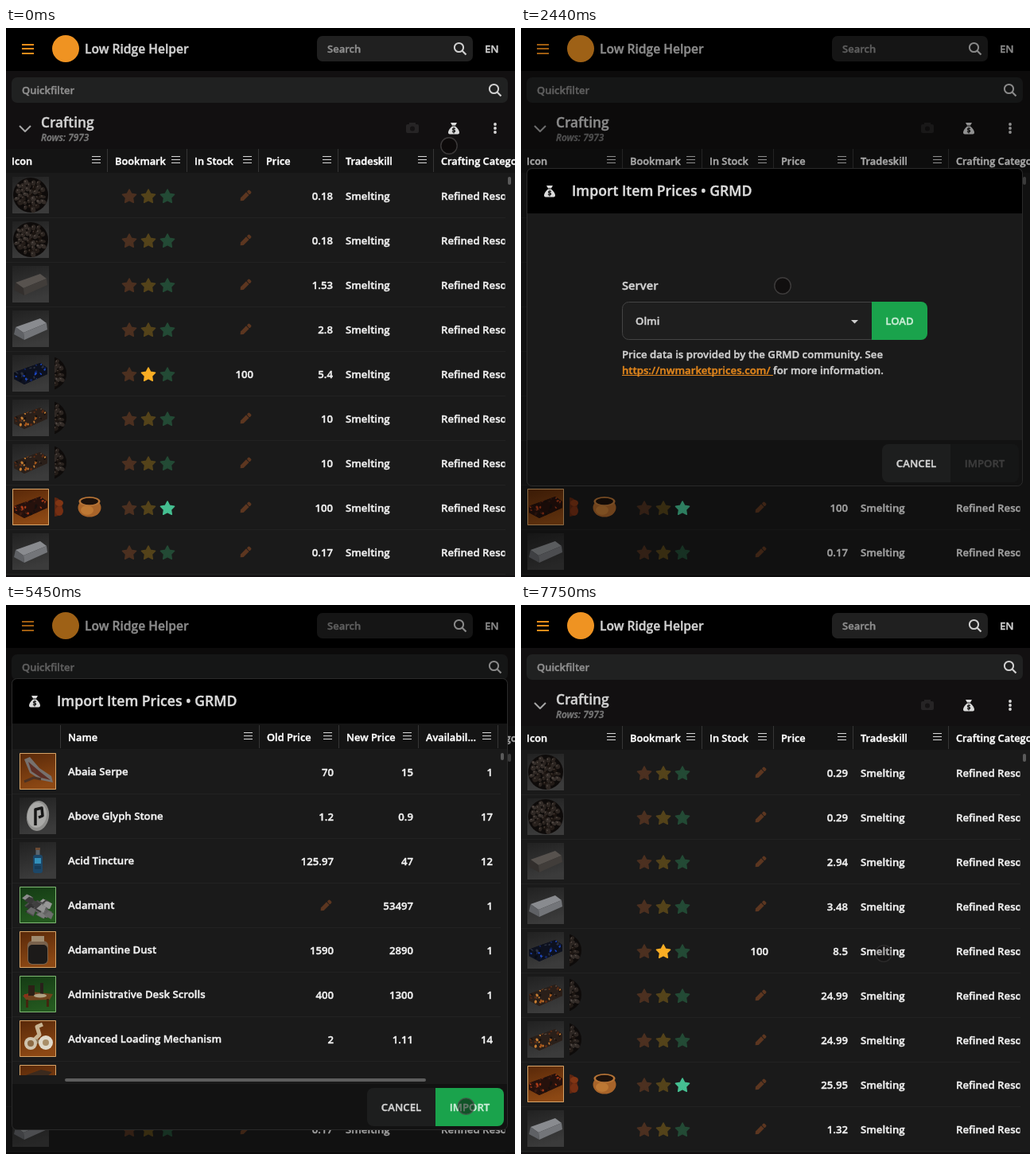
An HTML page with a canvas for the animation above (7.95 s loop, 640 by 690 pixels).

```html
<!DOCTYPE html>
<html lang="en">
<head>
<meta charset="utf-8">
<title>Price import</title>
<style>
html, body { margin: 0; width: 100%; height: 100%; overflow: hidden; background: #111; }
canvas { display: block; width: 640px; height: 690px; }
</style>
</head>
<body>
<canvas id="stage" width="640" height="690"></canvas>
<script>
const g = document.getElementById('stage').getContext('2d');
const LOOP = 7950;
const FONT = '"Open Sans", "Noto Sans", sans-serif';
const ORANGE = '#f18d1a', GREEN = '#1aa34c';
const grey = v => `rgb(${v},${v},${v})`;

const clamp = v => Math.max(0, Math.min(1, v));
const ramp = (t, a, b) => clamp((t - a) / (b - a));
const ease = v => v * v * (3 - 2 * v);

let seed = 1;
const rnd = () => (seed = seed * 16807 % 2147483647) / 2147483647;

// a hairline outline thickens the semibold letters without widening them
function text(s, x, y, size, color, align = 'left', weight = 600, style = '') {
  g.font = `${style} ${weight} ${size}px ${FONT}`;
  g.fillStyle = g.strokeStyle = color;
  g.textAlign = align;
  g.lineJoin = 'round';
  g.lineWidth = 0.4;
  g.fillText(s, x, y + size * 0.36);
  if (weight > 500) g.strokeText(s, x, y + size * 0.36);
}
function rect(x, y, w, h, color) {
  g.fillStyle = color;
  g.fillRect(x, y, w, h);
}
function round(x, y, w, h, r, fill, stroke) {
  g.beginPath();
  g.roundRect(x, y, w, h, r);
  if (fill) { g.fillStyle = fill; g.fill(); }
  if (stroke) { g.strokeStyle = stroke; g.lineWidth = 1; g.stroke(); }
}
function dot(x, y, rx, color, ry = rx, turn = 0) {
  g.beginPath();
  g.ellipse(x, y, rx, ry, turn, 0, 7);
  g.fillStyle = color;
  g.fill();
}
function line(pts, color, width) {
  g.beginPath();
  pts.forEach(p => g.lineTo(...p));
  g.strokeStyle = color;
  g.lineWidth = width;
  g.stroke();
}
function poly(pts, color) {
  g.beginPath();
  pts.forEach(p => g.lineTo(...p));
  g.closePath();
  g.fillStyle = color;
  g.fill();
}
function at(x, y, draw) {
  g.save();
  g.translate(x, y);
  draw();
  g.restore();
}
function faded(alpha, draw) {
  if (alpha <= 0) return;
  g.save();
  g.globalAlpha = alpha;
  draw();
  g.restore();
}
function clipped(x, y, w, h, draw) {
  g.save();
  g.beginPath();
  g.rect(x, y, w, h);
  g.clip();
  draw();
  g.restore();
}

// interface symbols
function star(x, y, color) {
  g.beginPath();
  for (let i = 0; i < 10; i++) {
    const r = i % 2 ? 4.6 : 9, a = i * Math.PI / 5 - Math.PI / 2;
    g.lineTo(x + r * Math.cos(a), y + 1 + r * Math.sin(a));
  }
  g.closePath();
  g.lineJoin = 'round';
  g.lineWidth = 1.6;
  g.strokeStyle = g.fillStyle = color;
  g.fill();
  g.stroke();
}
function pencil(x, y) {
  at(x, y, () => {
    g.rotate(-Math.PI / 4);
    poly([[-9, 0], [-6, -2.6], [4, -2.6], [4, 2.6], [-6, 2.6]], '#5c3620');
    round(4.8, -2.6, 4, 5.2, 1.5, '#5c3620');
  });
}
function lens(x, y) {
  g.beginPath();
  g.arc(x - 1.5, y - 1.5, 5.6, 0, 7);
  g.strokeStyle = '#d0d0d0';
  g.lineWidth = 2;
  g.stroke();
  line([[x + 2.5, y + 2.5], [x + 7.5, y + 7.5]], '#d0d0d0', 2.2);
}
function bag(x, y) {
  at(x, y, () => {
    poly([[-4, -7], [4, -7], [2, -3.5], [-2, -3.5]], '#dcdcdc');
    g.beginPath();
    g.moveTo(-2, -2.5);
    g.bezierCurveTo(-5, 0, -7, 3, -7, 5.5);
    g.quadraticCurveTo(-7, 7.5, -5, 7.5);
    g.lineTo(5, 7.5);
    g.quadraticCurveTo(7, 7.5, 7, 5.5);
    g.bezierCurveTo(7, 3, 5, 0, 2, -2.5);
    g.closePath();
    g.fill();
    text('$', 0, 2.8, 8, '#181818', 'center', 700);
  });
}
function colMenu(x, y) {
  for (const d of [-4, 0, 4]) rect(x - 5, y + d - 1, 11, 1, '#d8d8d8');
}

// item pictures
function ore(x, y, r = 23) {
  seed = 77;
  dot(x, y, r - 1, '#0e0b0a');
  for (let i = 0; i < 34; i++) {
    const a = i * 2.4, d = (r - 4) * Math.sqrt(i / 34), v = 16 + rnd() * 30;
    const px = x + d * Math.cos(a), py = y + d * Math.sin(a);
    dot(px, py, 2.4 + rnd() * 2, `rgb(${v + 8},${v + 1},${v - 3})`, 2 + rnd() * 1.6, a);
    dot(px - 1, py - 1, 1, `rgb(${v + 52},${v + 42},${v + 36})`, 0.7, a);
  }
}
const hull = [[-21, -1], [12, -13], [21, -7], [21, 1], [-8, 14], [-21, 7]];
function ingot(x, y, top, front, side, specks) {
  at(x, y, () => {
    poly([[-19, -2], [12, -13], [20, -7], [-9, 5]], top);
    poly([[-19, -2], [-9, 5], [-8, 14], [-21, 7]], front);
    poly([[-9, 5], [20, -7], [21, 1], [-8, 14]], side);
    if (!specks) return;
    poly(hull, top);
    g.clip();
    seed = 31;
    for (let i = 0; i < 44; i++)
      dot(-20 + rnd() * 40, -12 + rnd() * 25, 0.7 + rnd() * 1.6, specks[i % specks.length], 0.6 + rnd(), rnd() * 3);
  });
}
const backs = {
  plain: ['#212121', '#3b3b3b'],
  gold: ['#582809', '#8c4814', '#d7a468'],
  green: ['#143a14', '#24591f', '#7fb873']
};
function tile(x, y, kind) {
  const [a, b, edge] = backs[kind], grad = g.createLinearGradient(x, y, x + 12, y + 46);
  grad.addColorStop(0, a);
  grad.addColorStop(1, b);
  rect(x, y, 46, 46, grad);
  if (edge) { g.strokeStyle = edge; g.lineWidth = 1; g.strokeRect(x + .5, y + .5, 45, 45); }
}
const steel = (x, y) => ingot(x, y, '#898b8f', '#5f6165', '#737579');
const ember = (x, y) => ingot(x, y, '#2a1f19', 0, 0, ['#a8581c', '#57493f', '#5c2b13', '#c57c31', '#15100e']);
const pictures = [
  ore, ore,
  (x, y) => ingot(x, y, '#57524e', '#332f2d', '#413d3a'),
  steel,
  (x, y) => ingot(x, y, '#0d111f', 0, 0, ['#1c48c9', '#11235f', '#2b3140', '#080b14']),
  ember, ember,
  (x, y) => ingot(x, y, '#26110c', 0, 0, ['#a83a18', '#3c1a10', '#16100e']),
  steel
];

function pot(x, y) {
  dot(x, y + 2, 14.5, '#a8642a', 11.5);
  dot(x - 3, y + 5, 8, '#bd7834', 6);
  dot(x, y - 6, 13.5, '#b57336', 6);
  dot(x, y - 6, 11, '#1c110b', 4.2);
}

const loot = [
  ['Abaia Serpe', '70', '15', '1', 'gold', () => {
    poly([[-17, -15], [-10, -18], [2, -4], [17, 6], [19, 14], [4, 11], [-10, 2]], '#77716e');
    poly([[-12, -12], [2, 0], [16, 11], [4, 8], [-8, 0]], '#5e2f25');
    line([[-17, 13], [-5, 8], [4, 10]], '#4c3224', 3);
  }],
  ['Above Glyph Stone', '1.2', '0.9', '17', 'plain', () => {
    dot(0, 0, 14, '#8e8e8c', 19, .15);
    dot(-1, -1, 12, '#a9a9a7', 16, .15);
    line([[-3, 12], [-3, -8], [5, -10], [6, 0], [1, 2]], '#171717', 3.5);
  }],
  ['Acid Tincture', '125.97', '47', '12', 'plain', () => {
    rect(-2.5, -14, 5, 8, '#5a656e');
    rect(-3, -16, 6, 3, '#6b4a33');
    round(-6, -7, 12, 23, 3, '#1d4767');
    rect(-4, -3, 8, 7, '#3290bb');
    rect(-4, 7, 8, 4, '#173c59');
  }],
  ['Adamant', null, '53497', '1', 'green', () => {
    seed = 9;
    for (let i = 0; i < 30; i++) {
      const v = 40 + rnd() * 130, x = -15 + rnd() * 29, y = -10 + rnd() * 23;
      poly([[x - 6, y], [x, y - 5], [x + 6, y - 2], [x + 3, y + 5]], grey(v));
    }
  }],
  ['Adamantine Dust', '1590', '2890', '1', 'gold', () => {
    round(-13, -11, 26, 30, 6, '#79624c');
    round(-12, -6, 24, 24, 5, '#1c1a19');
    rect(-8, -17, 16, 7, '#9f8b70');
  }],
  ['Administrative Desk Scrolls', '400', '1300', '1', 'green', () => {
    poly([[-19, 2], [-8, -3], [19, 0], [15, 7], [-14, 8]], '#6f431d');
    rect(-15, 7, 3, 10, '#43260f');
    rect(11, 6, 3, 10, '#43260f');
    rect(-12, -11, 8, 13, '#2c2016');
    rect(3, -14, 4, 16, '#29201b');
    dot(3, 2, 8, '#b0a283', 2.5);
    rect(-17, 0, 5, 4, '#8a3119');
  }],
  ['Advanced Loading Mechanism', '2', '1.11', '14', 'gold', () => {
    line([[-6, 3], [2, -5], [-1, -15], [6, -18]], '#c8b493', 5);
    line([[-10, 2], [8, 5]], '#8f7756', 5);
    dot(-9, 6, 8, '#cfc3ad');
    dot(-9, 6, 4, '#8d6b45');
    dot(10, 5, 9, '#e0dacb');
    dot(10, 5, 4, '#a98f69');
  }],
  ['', '', '', '', 'gold', () => poly([[-18, -9], [4, -17], [18, -14], [10, -7]], '#3b2a1e')]
];

const before = ['0.18', '0.18', '1.53', '2.8', '5.4', '10', '10', '100', '0.17'];
const after = ['0.29', '0.29', '2.94', '3.48', '8.5', '24.99', '24.99', '25.95', '1.32'];
const columns = [['Icon', 7, 113], ['Bookmark', 137, 213], ['In Stock', 237, 303],
  ['Price', 327, 403], ['Tradeskill', 427, 523], ['Crafting Category', 547, 700]];

function tableRow(i, price) {
  const y = 211 + i * 56, top = y - 24;
  tile(8, top, i === 7 ? 'gold' : 'plain');
  pictures[i](31, y - 1);
  if (i > 3 && i < 7) clipped(61, top, 17, 46, () => ore(55, y - 1, 22));
  if (i === 7) {
    clipped(61, top, 14, 46, () => {
      dot(61, y - 1, 10, '#5d2611', 12);
      dot(67, y - 6, 5, '#813514', 4);
      dot(67, y + 4, 5, '#762f13', 6);
    });
    pot(105, y - 2);
  }
  star(155, y, '#4c3020');
  star(179, y, i === 4 ? '#f9ad24' : '#54431a');
  star(203, y, i === 7 ? '#45bf91' : '#234a35');
  if (i === 4) text('100', 311, y, 13.2, '#f2f2f2', 'right');
  else pencil(301, y);
  text(price, 411, y, 13.2, '#f2f2f2', 'right');
  text('Smelting', 427, y, 13.2, '#f2f2f2');
  clipped(540, top, 87.5, 50, () => text('Refined Resources', 547, y, 13.2, '#f2f2f2'));
  rect(0, y + 27, 628, 1, '#222');
}

function page(t) {
  rect(0, 0, 640, 690, '#121011');
  rect(0, 0, 640, 54, '#000');
  for (const y of [20, 25, 31]) rect(20, y, 15, 2, ORANGE);
  dot(75, 26, 17, '#ef9322');
  text('Low Ridge Helper', 99, 26, 15.6, '#d2d2d2');
  round(391, 10, 196, 32, 7, '#202020');
  text('Search', 404, 26, 13, '#8f8f8f');
  lens(571, 26);
  text('EN', 602, 26, 13.2, '#cfcfcf');

  round(7, 62, 624, 32, 7, '#202121');
  text('Quickfilter', 20, 78, 13, '#8f8f8f');
  lens(615, 78);

  line([[17, 123], [24, 130], [31, 123]], '#a5a5a5', 2);
  text('Crafting', 44, 119, 17.3, '#d2d2d2');
  text('Rows: 7973', 44, 138, 11.9, '#777', 'left', 600, 'italic');
  round(503, 121, 16, 11, 2, '#262425');
  rect(507, 119, 8, 3, '#262425');
  dot(511, 126.5, 3, '#151314');

  faded(ramp(t, 180, 330) * (1 - ramp(t, 1420, 1600)), () => round(539, 102, 48, 48, 7, '#393a3a'));
  bag(563, 126);
  for (const y of [121, 126, 131]) dot(615, y, 1.9, '#d8d8d8');

  rect(0, 152, 640, 30, '#141414');
  rect(0, 182, 640, 506, '#1a1a1a');
  for (const [name, x, menu] of columns) {
    text(name, x, 167, 12.8, '#fff');
    colMenu(menu, 166);
    if (x > 7) rect(x - 10, 152, 1, 29, '#363636');
  }
  const prices = t < 5970 ? before : after;
  prices.forEach((p, i) => tableRow(i, p));
  round(631, 187, 4, 10, 2, '#5a5a5a');
}

function button(label, x, y, w, h, fill, color, weight = 600, r = 8) {
  round(x, y, w, h, r, fill);
  text(label, x + w / 2, y + h / 2, 13.2, color, 'center', weight);
}

function choice() {
  button('GRMD IMPORTER', 239, 296, 160, 48, ORANGE, '#2d1a05', 500);
  button('JSON IMPORTER', 239, 408, 160, 48, ORANGE, '#2d1a05', 500);
  rect(24, 375, 269, 2, '#2b2b2b');
  rect(346, 375, 268, 2, '#2b2b2b');
  text('OR', 319, 376, 14.6, '#cfcfcf', 'center');
}

function serverForm(t) {
  text('Server', 127, 324, 14.7, '#d2d2d2');
  round(127.5, 344.5, 320, 47, 8, '#1e1e1e', '#444');
  text('Olmi', 144, 368, 13.2, '#cfcfcf');
  poly([[415, 367], [424, 367], [419.5, 371.5]], '#cfcfcf');
  const over = ramp(t, 3000, 3150);
  button('LOAD', 441, 344, 70, 48, GREEN, '#c9ecd5', 600, [0, 8, 8, 0]);
  faded(over * .2, () => round(441, 344, 70, 48, [0, 8, 8, 0], '#000'));
  text('Price data is provided by the GRMD community. See', 127, 410, 13.2, '#d0d0d0');
  const url = 'https://nwmarketprices.com/ ';
  text(url, 127, 430, 13.2, '#e0851c');
  const w = g.measureText(url).width;
  rect(127, 436, w, 1, '#e0851c');
  text('for more information.', 127 + w, 430, 13.2, '#d0d0d0');
}

function grid(t) {
  rect(8, 149, 622, 32, '#141414');
  for (const x of [68, 318, 418, 518, 618]) rect(x, 151, 1, 29, '#363636');
  round(74, 595, 454, 4, 2, '#5e5e5e');
  if (t < 4310) return;
  [['Name', 78, 304], ['Old Price', 328, 404], ['New Price', 428, 504], ['Availabil...', 528, 604]]
    .forEach(([name, x, menu]) => { text(name, x, 166, 12.8, '#fff'); colMenu(menu, 165); });
  round(622, 186, 4, 9, 2, '#5a5a5a');
  clipped(8, 181, 622, 410, () => loot.forEach(([name, old, now, stock, back, draw], i) => {
    const y = 209 + i * 56;
    tile(17, y - 23, back);
    clipped(18, y - 22, 44, 44, () => at(40, y, draw));
    text(name, 78, y, 13.2, '#f2f2f2');
    if (old === null) pencil(402, y + 1);
    else text(old, 412, y + 1, 13.2, '#f2f2f2', 'right');
    text(now, 512, y + 1, 13.2, '#f2f2f2', 'right');
    text(stock, 612, y + 1, 13.2, '#f2f2f2', 'right');
    rect(8, y + 28, 614, 1, '#222');
  }));
}

function importDialog(t) {
  const big = t >= 3680, ready = t >= 4170;
  const top = big ? 93 : 177, end = big ? 659 : 575;
  round(7.5, top - .5, 623, end - top + 1, 6, '#1a1a1a', '#2a2a2a');
  round(8, top, 622, 56, [6, 6, 0, 0], '#000');
  round(8, end - 57, 622, 57, [0, 0, 6, 6], '#121212');
  bag(36, top + 28);
  text('Import Item Prices' + (t < 1830 ? '' : ' • GRMD'), 64, top + 28, 17.6, '#dcdcdc');
  const y = end - 52;
  round(454, y, 172, 48, 8, '#151515');
  button('CANCEL', 454, y, 86, 48, '#1d1e1e', '#d2d2d2', 600, [8, 0, 0, 8]);
  button('IMPORT', 540, y, 86, 48, ready ? GREEN : '#151616', ready ? '#c9ecd5' : '#3c3c3c', 600, [0, 8, 8, 0]);
  if (ready) grid(t);
  else if (!big) {
    faded(1 - ramp(t, 1830, 1960), choice);
    faded(ramp(t, 1900, 2100), () => serverForm(t));
  }
}

function doneDialog() {
  round(127.5, 285.5, 383, 181, 6, '#222', '#292929');
  round(128, 286, 382, 52, [6, 6, 0, 0], '#000');
  text('Import Complete', 140, 313, 17.6, '#dcdcdc');
  text('Prices have been imported.', 136, 358, 15, '#cfcfcf');
  button('CLOSE', 427, 410, 75, 48, ORANGE, '#43270a', 600);
}

const path = [[0, 557, 148], [70, 557, 148], [330, 563, 130], [810, 563, 130], [1340, 350, 330], [1600, 329, 324],
  [2440, 329, 324], [2640, 345, 333], [3200, 476, 368], [3470, 476, 368], [3860, 605, 650],
  [5080, 605, 650], [5510, 577, 629], [6220, 577, 629], [6760, 496, 518], [7200, 420, 441], [7540, 456, 438], [LOOP, 456, 438]];
const clicks = [640, 1690, 3400, 5900, 7540];

function pointer(t) {
  const i = Math.max(1, path.findIndex(p => p[0] > t));
  const [t0, x0, y0] = path[i - 1], [t1, x1, y1] = path[i];
  const k = ease(ramp(t, t0, t1)), x = x0 + (x1 - x0) * k, y = y0 + (y1 - y0) * k;
  const press = clicks.some(c => t >= c && t < c + 130);
  faded(1 - .5 * ramp(t, 7610, 7750), () => {
    dot(x, y, 10, `rgba(8,4,4,${press ? .65 : .5})`);
    g.beginPath();
    g.arc(x, y, 10.2, 0, 7);
    g.strokeStyle = 'rgba(75,72,72,.75)';
    g.lineWidth = 1.4;
    g.stroke();
  });
}

function render(t) {
  g.clearRect(0, 0, 640, 690);
  page(t);
  const first = ramp(t, 700, 920) * (1 - ramp(t, 5970, 6070));
  const last = ramp(t, 6070, 6270) * (1 - ramp(t, 7580, 7750));
  faded(Math.max(first, last) * .34, () => rect(0, 0, 640, 690, '#000'));
  faded(ramp(t, 350, 480) * (1 - ramp(t, 1420, 1600)), () => {
    round(389, 112, 146, 28, 5, '#000');
    text('Open price importer', 397, 126, 13.2, '#e2e2e2');
  });
  faded(first, () => { if (t < 6070) importDialog(t); });
  faded(t < 7000 ? ramp(t, 6070, 6150) : last, doneDialog);
  pointer(t);
}

function tick(now) {
  render(now % LOOP);
  requestAnimationFrame(tick);
}
render(0);
requestAnimationFrame(tick);
</script>
</body>
</html>
```
